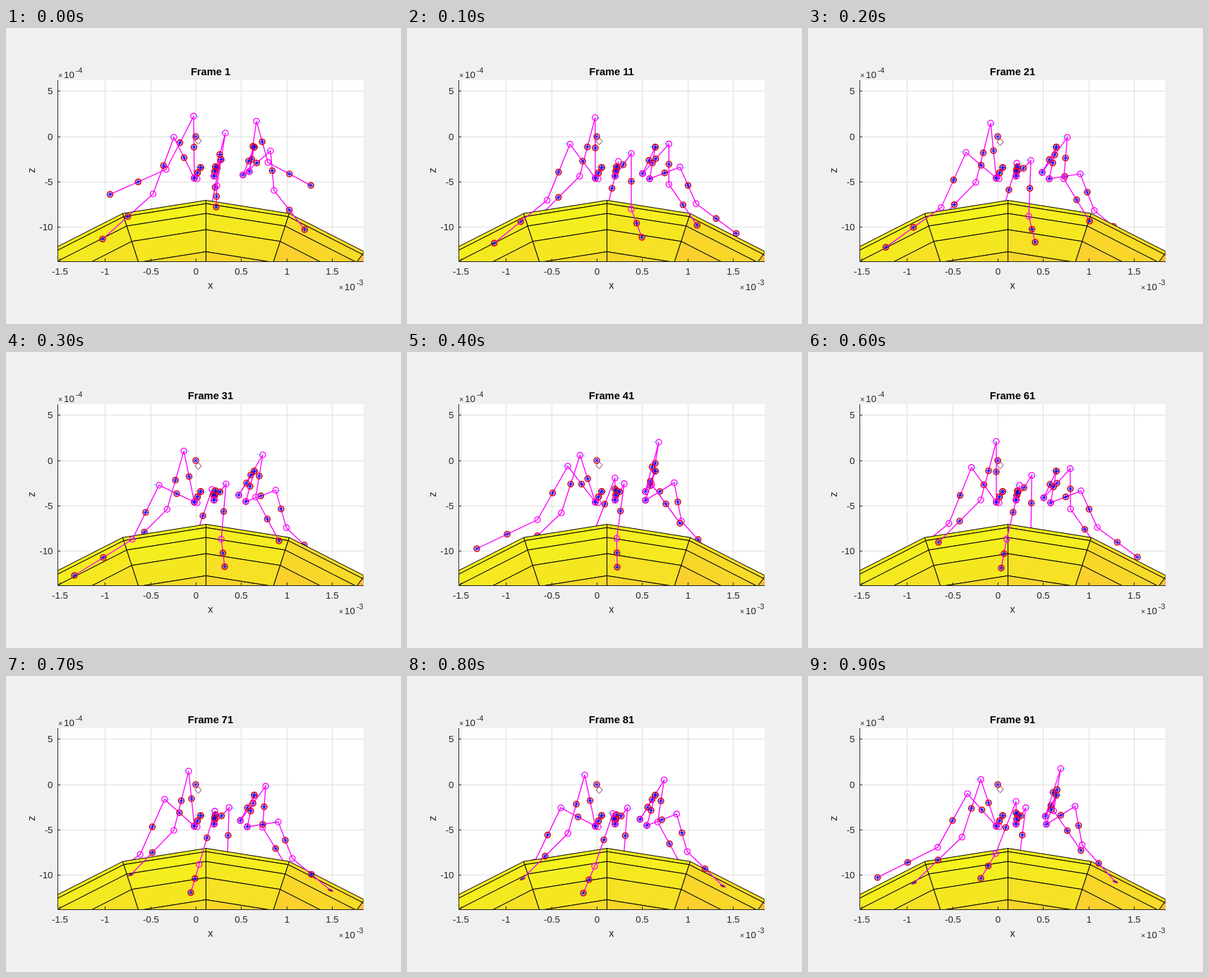
An HTML page that plays this animation: 560x420 px, repeating every 1000 ms.

```html
<!DOCTYPE html>
<html>
<head>
<meta charset="utf-8">
<style>
  html, body { margin: 0; width: 100%; height: 100%; overflow: hidden; background: #f0f0f0; }
  svg { display: block; width: 560px; height: 420px; }
  text { font: 13.33px Arial, "Liberation Sans", sans-serif; fill: #262626; }
  .mid { text-anchor: middle; }
  .end { text-anchor: end; }
  .label { font-size: 14.67px; }
  .small { font-size: 10.67px; }
  #title { font-weight: bold; fill: #000; }
  .link { fill: none; stroke: #f0f; stroke-width: 1.35; }
  .tick { stroke: #0ff; stroke-width: .7; }
</style>
</head>
<body>
<svg viewBox="0 0 560 420">
  <defs>
    <clipPath id="plot"><rect x="73" y="74" width="434" height="257.5"/></clipPath>
    <circle id="joint" r="4.1" fill="none" stroke="#f0f" stroke-width="1.3"/>
    <g id="mass" fill="none">
      <circle r="4.1" stroke="#f00" stroke-width="1.4"/>
      <path d="M-3.8 0H3.8M0 -3.8V3.8M-2.7 -2.7L2.7 2.7M-2.7 2.7L2.7 -2.7" stroke="#00f" stroke-width=".95"/>
    </g>
  </defs>
  <rect x="73" y="74" width="434" height="257" fill="#fff"/>
  <g id="grid" stroke="#dfdfdf"></g>
  <g clip-path="url(#plot)">
    <g id="far"></g>
    <g id="ball" stroke="#000"></g>
    <g id="near"></g>
  </g>
  <path id="axes" fill="none" stroke="#262626"/>
  <g id="labels"></g>
  <text id="title" class="mid label" x="290" y="67"></text>
  <text class="mid label" x="290" y="370">x</text>
  <text class="mid label" transform="translate(41 202) rotate(-90)">z</text>
  <text x="74" y="71"><tspan class="small">×</tspan><tspan x="82">10</tspan><tspan class="small" x="99" y="64">-4</tspan></text>
  <text x="472" y="372"><tspan class="small">×</tspan><tspan x="480">10</tspan><tspan class="small" x="497" y="365">-3</tspan></text>
</svg>
<script>
const $ = id => document.getElementById(id);
const STEP = 100, COUNT = 10, SWING = 4;

// keys: [base if it moves,] knee, ankle, tip from lift-off through the swing to touchdown.
// The stance then runs straight back to lift-off, with knee and ankle raised by bow.
const legs = [
  { hip: [276, 198], base: [267, 213], start: 3, bow: 7, sinks: true, keys: [
    [217, 189, 179, 266, 97, 317], [228, 162, 185, 238, 99, 279],
    [266, 125, 226, 200, 145, 234], [267, 127, 245, 210, 185, 270],
    [259, 135, 238, 219, 177, 282]] },
  { hip: [297, 197], base: [295, 210], start: 8, bow: 4, keys: [
    [292, 195, 266, 270, 250, 308], [295, 178, 266, 252, 245, 287],
    [311, 149, 299, 224, 298, 254], [318, 178, 318, 257, 333, 297],
    [316, 188, 313, 267, 322, 304]] },
  { hip: [352, 169], base: [], start: 3, bow: 2, sinks: true, keys: [
    [330, 203, 364, 146, 354, 206, 387, 268], [338, 198, 357, 128, 347, 188, 387, 243],
    [345, 203, 353, 128, 369, 187, 430, 219], [344, 214, 387, 197, 410, 249, 467, 291],
    [342, 214, 386, 207, 406, 259, 460, 304]] }
];

const lerp = (a, b, f) => a.map((v, i) => v + (b[i] - v) * f);

function pose({ hip, base, start, bow, keys }, phase) {
  const p = (phase - start + 2 * COUNT) % COUNT, i = Math.floor(p);
  const s = (p - SWING) / (COUNT - SWING);
  const v = s < 0 ? lerp(keys[i], keys[i + 1], p - i) : lerp(keys[SWING], keys[0], s);
  const flat = [...hip, ...base, ...v];
  const pts = [0, 2, 4, 6, 8].map(k => [flat[k], flat[k + 1]]);
  if (s > 0) for (const k of [2, 3]) pts[k][1] -= bow * Math.sin(Math.PI * s);
  return pts;
}

const mark = (id, [x, y], extra = "") =>
  `<use href="#${id}" transform="translate(${x} ${y})${extra}"/>`;

function drawLeg(leg, phase, side, sunk) {
  const pts = pose(leg, phase), [hip, base, knee, ankle, tip] = pts;
  const mids = pts.slice(1).map((p, i) => lerp(p, pts[i], .5));
  return [hip, knee].map(([x, y]) => `<path class="tick" d="M${x} ${y}l${8 * side} ${side}"/>`).join("") +
    `<polyline class="link" points="${pts.join(" ")}"/>` +
    [hip, base, ...mids].map(p => mark("mass", p)).join("") +
    [base, knee, ankle].map(p => mark("joint", p)).join("") +
    mark("mass", tip, sunk ? ` rotate(${tip[0] < 283 ? -20 : 22}) scale(.85 .35)` : "");
}

function draw(n) {
  $("title").textContent = "Frame " + (n * 10 + 1);
  // Far legs run half a cycle apart and slightly slower.
  $("far").innerHTML = legs.map(l => drawLeg(l, n * .973 + 5.06, 1)).join("");
  const y = 161 - Math.cos(n * Math.PI / 2.5);
  $("near").innerHTML =
    `<path d="M272.5 ${y - 5}l4.5 5l-4.5 5l-4.5 -5z" fill="none" stroke="#603" stroke-width=".8"/>` +
    mark("mass", [269, 154]) + mark("joint", [271, 214]) +
    legs.map(l => drawLeg(l, n, -1, l.sinks && n >= 7)).join("");
}

function drawAxes() {
  let grid = "", labels = "", ticks = "M73.5 74V331.5H507";
  for (let i = 0; i < 7; i++) {
    const x = Math.floor(76.3 + i * 64.36) + .5;
    grid += `<path d="M${x} 74V331"/>`;
    ticks += `M${x} 331v-4`;
    labels += `<text class="mid" x="${x}" y="350">${(i - 3) / 2}</text>`;
  }
  for (let i = 0; i < 4; i++) {
    const y = Math.floor(89.8 + i * 64.3) + .5;
    grid += `<path d="M73 ${y}H507"/>`;
    ticks += `M73 ${y}h4`;
    labels += `<text class="end" x="66.5" y="${y + 4.5}">${5 - i * 5}</text>`;
  }
  $("grid").innerHTML = grid;
  $("labels").innerHTML = labels;
  $("axes").setAttribute("d", ticks);
}

// A sphere seen along its axis: rings 9° apart, meridians 18° apart.
function ballPoint(ring, meridian) {
  const r = 382 * Math.cos(ring * Math.PI / 20), a = meridian * Math.PI / 10;
  return [283.5 + r * Math.sin(a), 626.5 - r * Math.cos(a)];
}

function drawBall() {
  let out = "";
  for (let m = -3; m < 3; m++)
    for (let k = 0; k < 7; k++) {
      const face = [ballPoint(k, m), ballPoint(k, m + 1), ballPoint(k + 1, m + 1), ballPoint(k + 1, m)];
      const drop = face[1][1] - 244.5;
      const fill = `rgb(${245 + Math.min(9, Math.max(0, drop - 50) * .11)},${245 - drop * .35},${27 + drop * .17})`;
      out += `<polygon points="${face.join(" ")}" fill="${fill}"/>`;
    }
  $("ball").innerHTML = out;
}

drawAxes();
drawBall();
let shown = -1;
function tick() {
  const n = Math.floor(performance.now() / STEP) % COUNT;
  if (n !== shown) draw(shown = n);
  requestAnimationFrame(tick);
}
tick();
</script>
</body>
</html>
```
